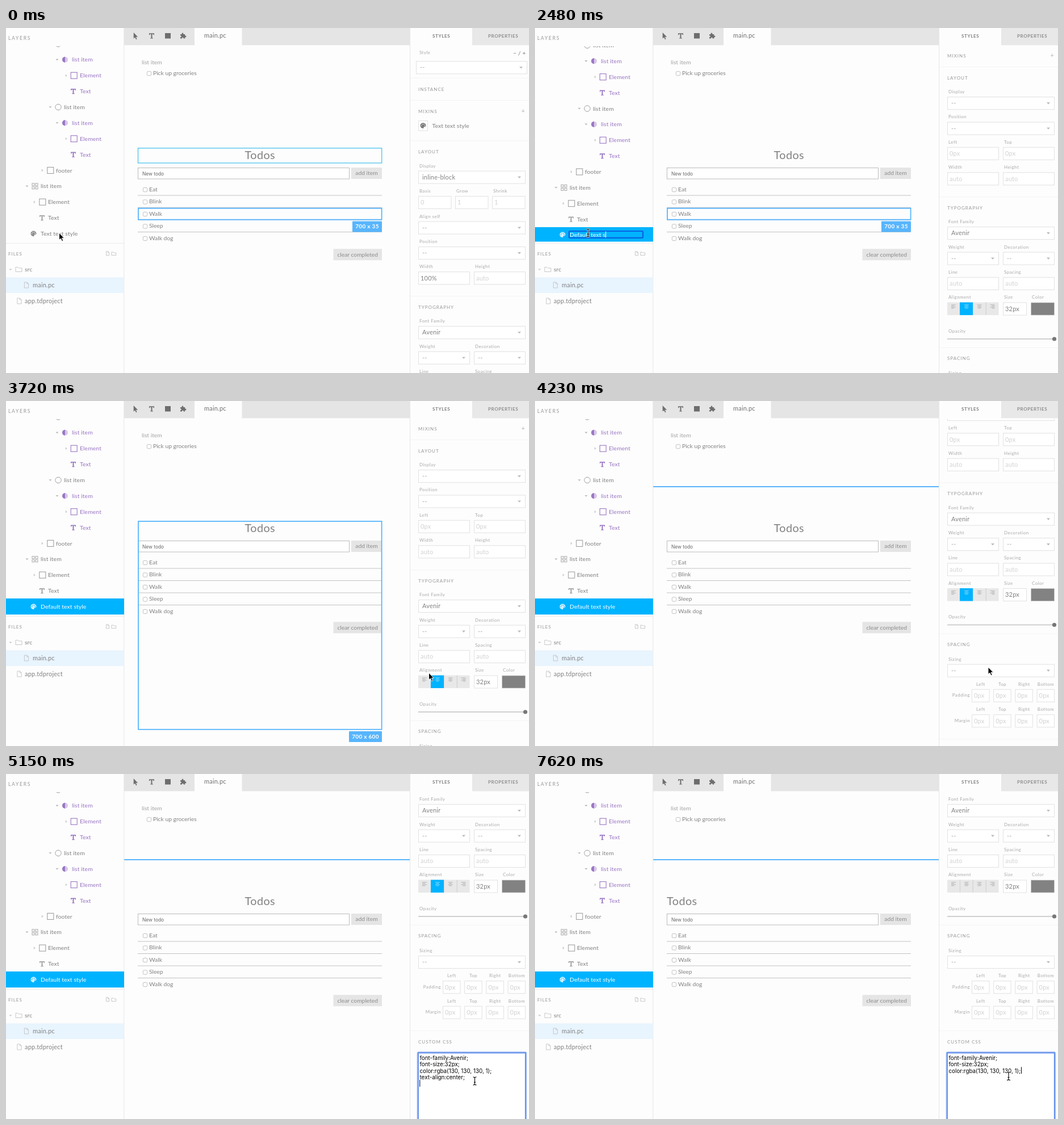
An HTML page that plays this animation: 921 px wide and 608 px high, repeating every 8000 ms.

```html
<!DOCTYPE html>
<html lang="en">
<head>
<meta charset="utf-8">
<title>Style editor</title>
<style>
html, body { margin: 0; width: 100%; height: 100%; overflow: hidden; background: #fdfdfd; }
svg { display: block; width: 100%; height: 100%; }
text { font-family: Lato, "Open Sans", sans-serif; white-space: pre; }
.sys { font-family: Inter, "Liberation Sans", sans-serif; }
</style>
</head>
<body>
<svg id="stage" viewBox="0 0 921 608"></svg>
<script>
const BLUE = '#00b3ff', FRAME = '#58b5fd', PURPLE = '#9a76c4', GREY = '#828282';
const PALE = '#d2d2d2', LABEL = '#a8a8a8', EDGE = '#e2e2e2';

// name: [size, letter spacing, weight]
const FONTS = {
  tree: [10.4, .08, 400], page: [10.3, 0, 400], title: [19.8, .45, 400], field: [11, .2, 400],
  label: [8, .45, 400], head: [8, 1, 400], layers: [8.6, 1.7, 400], tab: [8, .6, 700],
  badge: [10, .3, 700], sys: [9.85, 0, 400], small: [8.4, 0, 400]
};

// ---- drawing helpers (text is placed by its vertical centre) ----
function text(x, cy, str, font = 'tree', fill = GREY, extra = '') {
  const [size, gap, weight] = FONTS[font];
  const cls = font === 'sys' || font === 'small' ? 'class="sys"' : '';
  return `<text x="${x}" y="${cy + size * .345}" font-size="${size}" letter-spacing="${gap}" font-weight="${weight}" fill="${fill}" ${cls} ${extra}>${str}</text>`;
}
const rect = (x, y, w, h, fill, extra = '') =>
  `<rect x="${x}" y="${y}" width="${w}" height="${h}" fill="${fill}" ${extra}/>`;
const box = (x, y, w, h, stroke, width = 1, fill = 'none', extra = '') =>
  rect(x, y, w, h, fill, `stroke="${stroke}" stroke-width="${width}" ${extra}`);
const path = (d, fill, extra = '') => `<path d="${d}" fill="${fill}" ${extra}/>`;
const line = (d, stroke, width = 1) => path(d, 'none', `stroke="${stroke}" stroke-width="${width}"`);
const group = (id, body, extra = '') => `<g id="${id}" ${extra}>${body}</g>`;
const clip = (id, x, y, w, h) => `<clipPath id="${id}">${rect(x, y, w, h, '#000')}</clipPath>`;

// ---- icons ----
const down = (x, y, c = '#bbb', r = 3) => path(`M${x - r} ${y - r / 2}h${2 * r}l${-r} ${r * 1.1}z`, c);
const right = (x, y, c = '#ccc') => path(`M${x - 1.2} ${y - 2.6}v5.2l2.8 -2.6z`, c);
const square = (x, y, c) => box(x - 5.5, y - 5.5, 11, 11, c, 1.1);
const letter = (x, y, c) =>
  path(`M${x - 4.5} ${y - 4.5}h9v3h-1l-.6 -1.6h-1.9v6.6l1.4 .5v.7h-4.8v-.7l1.4 -.5v-6.6h-1.9l-.6 1.6h-1z`, c);
const ring = (x, y, c) => `<circle cx="${x}" cy="${y}" r="5.2" fill="none" stroke="${c}"/>`;
const half = (x, y, c) =>
  `<circle cx="${x}" cy="${y}" r="5" fill="${c}" opacity=".4"/>` + path(`M${x} ${y - 5}a5 5 0 0 0 0 10z`, c);
const grid = (x, y, c) => [[-5, -5], [1, -5], [-5, 1], [1, 1]]
  .map(([dx, dy]) => box(x + dx, y + dy, 4, 4, c, .9)).join('');
const palette = (x, y, c, hole) =>
  path(`M${x} ${y - 4.8}a5 4.8 0 1 0 0 9.6c1.8 0 .8 -1.6 1 -2.3c.4 -1 4 .4 4 -2.8a5 4.6 0 0 0 -5 -4.5z`, c) +
  [[-2.8, .2], [-1.4, -2.3], [1.4, -2.3], [2.9, 0]]
    .map(([dx, dy]) => `<circle cx="${x + dx}" cy="${y + dy}" r=".8" fill="${hole}"/>`).join('');
const file = (x, y, s = 1) =>
  line(`M${x - 3.6 * s} ${y - 5 * s}h${4.4 * s}l${2.8 * s} ${2.8 * s}v${7.2 * s}h${-7.2 * s}zM${x + .8 * s} ${y - 5 * s}v${2.8 * s}h${2.8 * s}`, '#bbb', .8);
const folder = (x, y, s = 1) =>
  line(`M${x - 5.5 * s} ${y - 4 * s}h${4 * s}l${1.3 * s} ${1.5 * s}h${5.7 * s}v${6.5 * s}h${-11 * s}z`, '#bbb', .8);

// ---- layers and files ----
function layers() {
  const pitch = 27.87, last = 362.4;
  const rows = [ // icon, icon x, text x, label, colour, arrow
    [ring, 92, 102, 'list item', GREY, down], [half, 104, 116, 'list item', PURPLE, down],
    [square, 119.7, 130, 'Element', PURPLE, right], [letter, 118.5, 130, 'Text', PURPLE],
    [ring, 92, 102, 'list item', GREY, down], [half, 104, 116, 'list item', PURPLE, down],
    [square, 119.7, 130, 'Element', PURPLE, right], [letter, 118.5, 130, 'Text', PURPLE],
    [square, 78.3, 88, 'footer', GREY, right], [grid, 51, 61, 'list item', GREY, down],
    [square, 64.3, 74, 'Element', GREY, right], [letter, 63.5, 74, 'Text', GREY]
  ];
  return rows.map(([icon, ix, tx, label, c, arrow], i) => {
    const y = last - (rows.length - i) * pitch;
    const ax = Math.round(ix - 14);
    const mark = arrow === down ? down(ax, y, '#bbb', 2.6) : arrow ? right(ax, y) : '';
    return mark + icon(ix, y, c === GREY ? '#a0a0a0' : c) + text(tx, y, label, 'tree', c);
  }).join('');
}

const files = line('M0 379.5H208', '#ebebeb') + text(4, 398.3, 'FILES', 'head', '#999') +
  file(179, 397.3, .7) + folder(189.8, 397.8, .7) +
  down(8, 425.8, '#ccc', 2.6) + folder(22.5, 425.5) + text(33, 425.5, 'src') +
  rect(0, 439.5, 207.5, 27.5, '#e8f4fe') + file(36, 453) + text(47, 453, 'main.pc', 'field') +
  file(23.5, 481) + text(33, 481, 'app.tdproject', 'field');

// ---- canvas ----
const check = (x, y) => box(x - 3.6, y - 3.4, 7.2, 7.2, '#b4b4b4', .8, '#fff', 'rx="1.6"');
const badge = (x, y, w, str) => rect(x, y, w, 19, FRAME, 'rx="1"') +
  text(x + w / 2, y + 9.3, str, 'badge', '#fff', 'text-anchor="middle"');
const button = (x, y, w, str) => rect(x, y, w, 20, '#e5e5e5') +
  text(x + w / 2, y + 9.8, str, 'page', '#8c8c8c', 'text-anchor="middle"');

const page = text(239, 60.8, 'list item', 'page', '#a3a3a3') + check(252, 80) + text(259, 79.5, 'Pick up groceries', 'page') +
  `<g id="title">${text(0, 224.5, 'Todos', 'title')}</g>` +
  box(232.5, 246.5, 372, 19.5, '#bbb', 1, '#fff') + text(240, 257, 'New todo', 'small', '#666') +
  button(608, 246, 54, 'add item') + button(576.5, 389.3, 85.5, 'clear completed') +
  ['Eat', 'Blink', 'Walk', 'Sleep', 'Walk dog'].map((s, i) => {
    const y = 284.3 + i * 21.5;
    return check(245, y + .5) + text(252, y, s, 'page') + (i < 4 ? line(`M232 ${y + 10.7}H662`, '#c2c2c2') : '');
  }).join('');

const overlays =
  group('hoverTitle', box(232.5, 211.7, 429.2, 26.2, '#4cc4ee', 1.3)) +
  group('hoverTop', box(208.5, 30.5, 502, 95, '#4cc4ee', 1)) +
  group('hoverRow', box(233, 317.7, 428.6, 20, FRAME, 1.8) + badge(610, 340.6, 52, '700 x 35')) +
  group('hoverPage', box(233, 212, 428.6, 366.8, FRAME, 1.8) + badge(604, 582, 58, '700 x 600')) +
  group('frameEdge', line('M208 151H711', FRAME, 1.8));

const toolbar = rect(208, 0, 503.5, 30.3, '#e5e5e5') + rect(332, 0, 83.5, 31, '#fdfdfd') +
  path('M224.7 8v10.6l2.5 -2.2l1.8 3.8l1.6 -.8l-1.8 -3.6h3.4z', '#6e6e6e') + letter(256.5, 13.8, '#6e6e6e') +
  rect(280, 9, 10, 9.5, '#6e6e6e') +
  path('M307 11h2.7c-1 -3.4 3.6 -3.4 2.6 0h2.9v2.6c3 -.9 3 3.5 0 2.6v2.4h-2.6c.8 -2.6 -3.4 -2.6 -2.6 0h-3v-2.6c2.4 .5 2.4 -3 0 -2.5z', '#6e6e6e') +
  text(349, 13.5, 'main.pc', 'field', '#707070');

// ---- style panel ----
const label = (x, y, s) => text(x, y, s, 'label', LABEL);
const head = (y, s) => text(726, y, s, 'head', '#999');
const rule = y => line(`M712 ${y}H921`, '#f4f4f4');
const plus = y => text(907.5, y, '+', 'field', '#b4b4b4');
const input = (x, y, w, s, c = PALE) => box(x + .5, y + .5, w - 1, 22, EDGE, 1, '#fff') + text(x + 4, y + 11.5, s, 'field', c);
const select = (x, y, w, s = '--') => box(x + .5, y + .5, w - 1, 22, EDGE, 1, '#fff') +
  text(x + 7, y + 11.3, s, 'field', s === '--' ? LABEL : GREY) + down(x + w - 11, y + 11.5);
const wide = (y, name, s) => label(728, y, name) + select(726, y + 8.8, 189, s);
const pair = (y, a, b, cell) => label(728, y, a) + label(826, y, b) + cell(726, y + 8.8, 91) + cell(824, y + 8.8, 91);
const auto = (x, y, w) => input(x, y, w, 'auto');
const pixels = (x, y, w) => input(x, y, w, '0px');
const dashes = (x, y, w) => select(x, y, w);

function edges(y, name) {
  return text(766, y + 19.5, name, 'label', LABEL, 'text-anchor="end"') + ['Left', 'Top', 'Right', 'Bottom'].map((s, i) => {
    const x = 769 + i * 38.2;
    return text(x + 15.8, y, s, 'label', LABEL, 'text-anchor="middle"') + pixels(x, y + 8.8, 31.5);
  }).join('');
}

const alignBars = (x, y, side, c) => [8, 5, 8, 5].map((w, i) =>
  rect(x + (8 - w) * side / 2, y + i * 2, w, .8, c)).join('');
const alignment = rect(726, 483.5, 90.5, 22.5, '#e8e8e8') +
  [748.5, 771.2, 794.3].map(x => line(`M${x} 483.5v22.5`, '#c8c8c8', .8)).join('') +
  [0, 1, 1, 2].map((side, i) => alignBars(733 + i * 22.8, 487.5, side, '#a5a5a5')).join('') +
  group('centred', rect(748, 483.5, 23, 22.5, BLUE) + alignBars(755.8, 487.5, 1, '#a5e0ff'));

const instancePanel = label(728, 42.8, 'Style') + text(893, 44.5, '− / +', 'tree', '#777') + select(722, 58.3, 196) +
  rule(88.5) + head(107.8, 'INSTANCE') + rule(127.5) + head(146.8, 'MIXINS') + plus(146.3) +
  box(726.5, 163.5, 16, 17.5, EDGE, 1, '#fff') + palette(734.5, 172, '#777', '#fff') + text(750.5, 172.3, 'Text text style') +
  rule(198.5) + head(218.3, 'LAYOUT') + wide(242.8, 'Display', 'inline-block') +
  ['Basis', 'Grow', 'Shrink'].map((s, i) => label(728 + i * 65, 287, s) + input(726 + i * 65, 296, 58.5, i ? '1' : '0')).join('') +
  wide(331.8, 'Align self') + wide(376.3, 'Position') +
  label(728, 420.7, 'Width') + label(826, 420.7, 'Height') + input(726, 429.3, 91, '100%', GREY) + auto(824, 429.3, 91) +
  rule(472.5) + head(491.8, 'TYPOGRAPHY') + wide(516.5, 'Font Family', 'Avenir') +
  pair(561, 'Weight', 'Decoration', dashes) + pair(605.3, 'Line', 'Spacing', auto);

const css = ['font-family:Avenir;', 'font-size:32px;', 'color:rgba(130, 130, 130, 1);', 'text-align:center;'];
const stylePanel = head(49, 'MIXINS') + plus(48.5) + rule(68.5) + head(87.8, 'LAYOUT') +
  wide(112.3, 'Display') + wide(156.7, 'Position') + pair(201, 'Left', 'Top', pixels) + pair(245.5, 'Width', 'Height', auto) +
  rule(297.5) + head(316.8, 'TYPOGRAPHY') + wide(341.3, 'Font Family', 'Avenir') +
  pair(385.8, 'Weight', 'Decoration', dashes) + pair(430.2, 'Line', 'Spacing', auto) +
  label(728, 474.7, 'Alignment') + label(826, 474.7, 'Size') + label(875, 474.7, 'Color') + alignment +
  input(824, 483.5, 42, '32px', GREY) + rect(873.5, 484, 41, 22, '#828282', 'stroke="#ccc" stroke-width=".7"') +
  label(728, 534, 'Opacity') + rect(726, 547, 189, 2, '#d0d0d0') + '<circle cx="914.5" cy="548" r="3.6" fill="#777"/>' +
  rule(563.5) + head(582.6, 'SPACING') + wide(608.3, 'Sizing') + edges(652.5, 'Padding') + edges(697, 'Margin') +
  rule(749.5) + head(768.8, 'CUSTOM CSS') + box(726.5, 788.5, 188, 140, EDGE, 1, '#fff') +
  group('focus', box(725.3, 787.8, 190.2, 142, '#b4caf6', 3.6, 'none', 'rx="2"') + box(725.8, 788.3, 189.2, 141, '#6591ea', 2)) +
  group('marked', rect(728.5, 826, 79, 12, '#b3d7ff')) +
  css.map((s, i) => group('css' + i, text(728.5, 797.2 + i * 11.5, s, 'sys', '#000'))).join('') +
  rect(0, 0, 1, 12, '#000', 'id="caret"');

const tabs = rect(711, 0, 210, 31, '#fdfdfd') + rect(821, 0, 100, 30.3, '#e8e8e8') + line('M711.5 0V608', '#e6e6e6') +
  text(751, 14.7, 'STYLES', 'tab', '#808080') + text(849, 14.7, 'PROPERTIES', 'tab', '#8c8c8c');

const renameBox = rect(0, 351, 208, 25.5, BLUE) + palette(48.5, 364.3, '#d3f0ff', BLUE) +
  box(60, 358, 130, 11.8, '#0a62e0', 2.2, 'none', 'rx="1.5"') + rect(61, 359, 65, 9.8, '#83c3f6', 'id="picked"') +
  text(61, 364.2, '', 'tree', '#fff', 'id="typed"') + rect(0, 358.5, 1, 11, '#fff', 'id="typeCaret"');

const cursors =
  group('arrow', path('M0 0V12.6L2.9 10L5 14.7L7.2 13.7L5.1 9.2H9z', '#000', 'stroke="#fff" stroke-width="1"')) +
  group('beam', ['#fff', '#000'].map((c, i) =>
    line('M-3 -7q3 0 3 1.6q0 -1.6 3 -1.6M0 -5.6V5.6M-3 7q3 0 3 -1.6q0 1.6 3 1.6M-1.6 2.2h3.2', c, i ? 1.1 : 2.6)).join(''));

const stage = document.getElementById('stage');
stage.innerHTML = `<defs>${clip('treeClip', 0, 32, 208, 345)}${clip('panelClip', 712, 31, 209, 577)}</defs>` +
  rect(0, 0, 921, 608, '#fdfdfd') + page + overlays + toolbar +
  rect(0, 0, 208, 608, '#fdfdfd') + line('M207.8 0V608', '#e6e6e6') + text(4, 18, 'LAYERS', 'layers', '#999') +
  `<g clip-path="url(#treeClip)">${group('tree', layers())}` +
  group('plainRow', palette(48.5, 362.4, '#8c8c8c', '#fdfdfd') + text(61, 362.4, 'Text text style')) +
  group('doneRow', rect(0, 348, 208, 28.3, BLUE) + palette(48.5, 362.4, '#d3f0ff', BLUE) +
    text(61, 362.4, 'Default text style', 'tree', '#fff')) +
  group('rename', renameBox) + '</g>' + files + tabs +
  `<g clip-path="url(#panelClip)">${group('instance', instancePanel)}${group('styles', stylePanel)}</g>` + cursors;

// ---- timeline ----
const $ = {};
stage.querySelectorAll('[id]').forEach(el => { $[el.id] = el; });
const show = (id, on) => $[id].setAttribute('display', on ? 'inline' : 'none');
const move = (id, x, y) => $[id].setAttribute('transform', `translate(${x} ${y})`);
const at = (steps, t) => steps.reduce((v, s) => s[0] <= t ? s[1] : v, null);

const TYPED = [[1100, 1], [1250, 2], [1460, 4], [1550, 5], [1760, 7], [1940, 9],
  [2150, 10], [2480, 14], [2810, 15], [2930, 16], [3040, 18]];
const SCROLL = [[0, 0], [4230, 153.5], [4380, 212], [4490, 252], [4600, 281], [4710, 297]];
const POINTER = [[0, [93.5, 361]], [3490, [330, 415]], [3600, [560, 458]], [3720, [744.5, 479]], [3810, [798, 469]],
  [4710, [807, 492]], [4830, [819, 524]], [4940, [825.5, 541]], [5840, [829, 538]], [5960, [832, 534]], [6080, [834, 532.5]]];
const CARET = [[0, null], [5150, [728.3, 836]], [5600, null], [6080, [807, 825]], [6650, null],
  [6760, [728.3, 825]], [7090, null], [7620, [856, 813.3]]];

function draw(t) {
  const between = (a, b) => t >= a && t < b;
  const editing = between(650, 3310);

  move('tree', 0, editing ? 2.5 : 0);
  show('plainRow', t < 650);
  show('rename', editing);
  show('doneRow', t >= 3310);
  const typed = at(TYPED, t);
  $.typed.textContent = typed ? 'Default text style'.slice(0, typed) : 'Text text style';
  show('picked', !typed);
  show('typeCaret', editing && typed);
  if (editing) $.typeCaret.setAttribute('x', 61.2 + $.typed.getComputedTextLength());

  show('hoverTitle', t < 650);
  show('hoverTop', between(470, 650));
  show('hoverRow', t < 3490);
  show('hoverPage', between(3490, 3810));
  show('frameEdge', t >= 3810);
  move('title', t < 6970 ? 420.5 : 232, 0);

  show('instance', t < 650);
  show('styles', t >= 650);
  move('styles', 0, -at(SCROLL, t));
  show('centred', t < 6760);
  show('focus', t >= 5150);
  show('marked', between(6650, 6760));
  show('css3', t < 6760);
  const caret = at(CARET, t);
  show('caret', caret);
  if (caret) move('caret', ...caret);

  const beam = editing || t >= 4830;
  show('beam', beam);
  show('arrow', !beam);
  move(beam ? 'beam' : 'arrow', ...at(POINTER, t));
}

const start = performance.now();
function tick() {
  draw((performance.now() - start) % 8000);
  requestAnimationFrame(tick);
}
tick();
</script>
</body>
</html>
```
